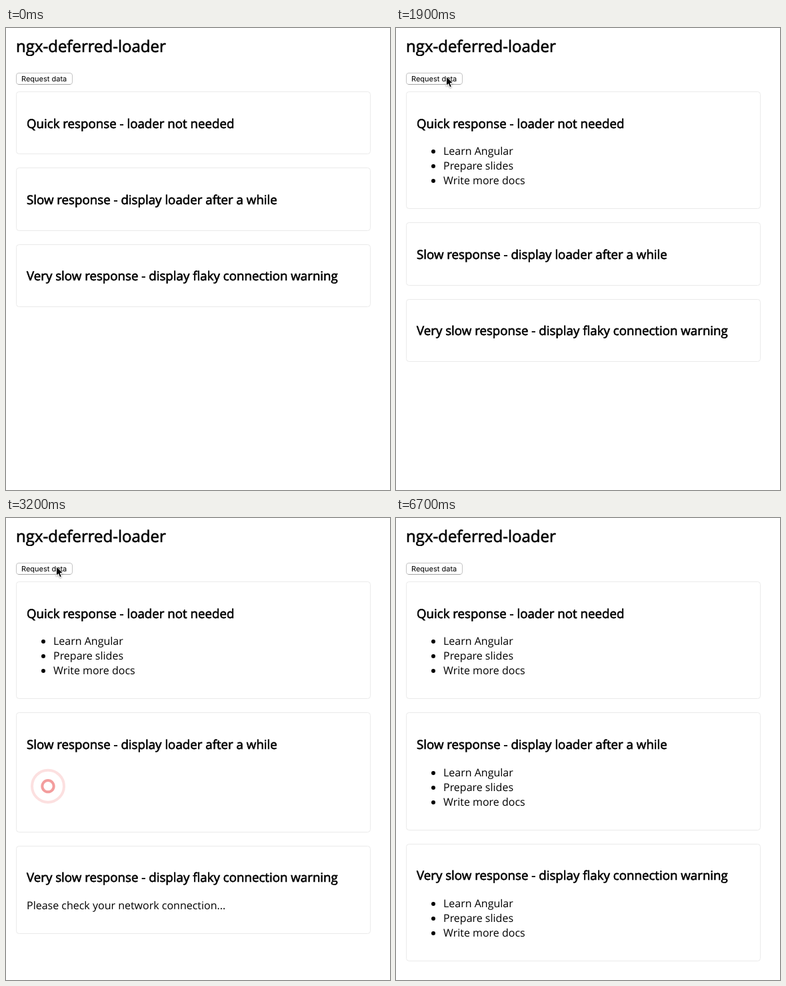
Write an HTML page that moves like this. It is 576 by 692 pixels and loops after 9.5 s.

```html
<!DOCTYPE html>
<html lang="en">
<head>
<meta charset="utf-8">
<title>ngx-deferred-loader</title>
<style>
  html, body { margin: 0; width: 100%; height: 100%; overflow: hidden; background: #fff; }
  svg { display: block; width: 576px; height: 692px; }
  text { font-family: "Open Sans", sans-serif; font-size: 16px; text-rendering: geometricPrecision; }
  .title, .heading { stroke: #000; stroke-width: .65px; }
  .title { font-size: 24px; }
  .heading { font-size: 18.72px; }
  .button { font-family: Inter, sans-serif; font-size: 11px; }
  .card { fill: #fff; stroke: #eaeaea; }
  .ring { fill: none; stroke: #f08080; stroke-width: 4; }
</style>
</head>
<body>
<svg id="stage" viewBox="0 0 576 692">
  <defs>
    <linearGradient id="pressed" x2="0" y2="1">
      <stop stop-color="#6bb1fa"/><stop offset="1" stop-color="#0b68fb"/>
    </linearGradient>
    <filter id="shadow" x="-50%" y="-50%" width="200%" height="200%">
      <feDropShadow dx="0" dy="1" stdDeviation="1" flood-opacity=".4"/>
    </filter>
  </defs>
  <g id="scene"></g>
</svg>
<script>
const LOOP = 9500, STEP = 100;
const LOADER_START = 2080;
const PLAIN_HEIGHT = 94.4, LINE = 22, GAP = 20;
const TODOS = ["Learn Angular", "Prepare slides", "Write more docs"];

const CARDS = [
  { heading: "Quick response - loader not needed", done: 1900 },
  { heading: "Slow response - display loader after a while", loading: 2100, done: 3700 },
  { heading: "Very slow response - display flaky connection warning", warning: 2700, done: 5700 },
];

const scene = document.getElementById("scene");

const label = (x, y, content, cls = "", fill = "#000") =>
  `<text class="${cls}" x="${x}" y="${Math.round(y)}" fill="${fill}">${content}</text>`;

// cubic-bezier(0, .2, .8, 1), solved by bisection
function rippleEase(x) {
  let low = 0, high = 1;
  for (let i = 0; i < 24; i++) {
    const u = (low + high) / 2;
    if (2.4 * u * u - 1.4 * u ** 3 < x) low = u; else high = u;
  }
  return .6 * low + 1.8 * low ** 2 - 1.4 * low ** 3;
}

function loader(cx, cy, time) {
  return [0, .5].map(offset => {
    const grown = rippleEase(((time - LOADER_START) / 1000 + offset) % 1);
    return `<circle class="ring" cx="${cx}" cy="${cy}" r="${2 + 29 * grown}" opacity="${1 - grown}"/>`;
  }).join("");
}

const todoList = baseline => TODOS.map((todo, i) => {
  const y = Math.round(baseline + i * LINE);
  return `<circle cx="56" cy="${y - 5}" r="3"/>` + label(71, y, todo);
}).join("");

function cardBody(card, top, time) {
  const baseline = top + 95.4;
  if (time >= card.done) return { height: 176.4, markup: todoList(baseline) };
  if (time >= card.loading) return { height: 179.4, markup: loader(63, top + 110.3, time) };
  if (time >= card.warning) {
    return { height: 132.4, markup: label(31, baseline, "Please check your network connection...") };
  }
  return { height: PLAIN_HEIGHT, markup: "" };
}

function cards(time) {
  let top = 95;
  return CARDS.map(card => {
    const { height, markup } = cardBody(card, top, time);
    const y = Math.round(top), bottom = Math.round(top + height);
    const box = `<rect class="card" x="15.5" y="${y + .5}" width="531" height="${bottom - y - 1}" rx="4"/>`;
    const heading = label(31, top + 54.6, card.heading, "heading");
    top += height + GAP;
    return box + heading + markup;
  }).join("");
}

function button(time) {
  const pressed = time >= 1600 && time < 1700;
  const fill = pressed ? "url(#pressed)" : "#fff";
  const border = pressed ? "#3c86ee" : "#c4c4c4";
  const edge = pressed ? "#1a5fd0" : "#a6a6a6";
  return `<rect x="15.5" y="67.5" width="84" height="17" rx="3.5" fill="${fill}" stroke="${border}"/>
    <path d="M18.5 84.5H96.5" stroke="${edge}"/>` +
    label(23, 80, "Request data", "button", pressed ? "#fff" : "#000");
}

function cursor(time) {
  if (time < 300 || time >= 6700) return "";
  const away = Math.max(0, 1 - (time - 300) / 800) ** 2;
  const leaving = Math.max(0, (time - 6100) / 500) ** 2;
  const x = 75 + 379 * away + 405 * leaving;
  const y = 72 - 16 * away + 4 * leaving;
  return `<path transform="translate(${x} ${y})" filter="url(#shadow)" stroke="#fff" stroke-linejoin="round"
    d="M.5.8V14.6L3.6 11.7 5.8 16.8 8.4 15.7 6.2 10.7H10.6Z"/>`;
}

function draw(time) {
  scene.innerHTML = label(15, 36, "ngx-deferred-loader", "title") +
    button(time) + cards(time) + cursor(time);
}

const start = performance.now();
let shown = -1;

function tick() {
  const elapsed = (performance.now() - start) % LOOP;
  const time = Math.floor(elapsed / STEP) * STEP;
  if (time !== shown) draw(shown = time);
  requestAnimationFrame(tick);
}
tick();
</script>
</body>
</html>
```
